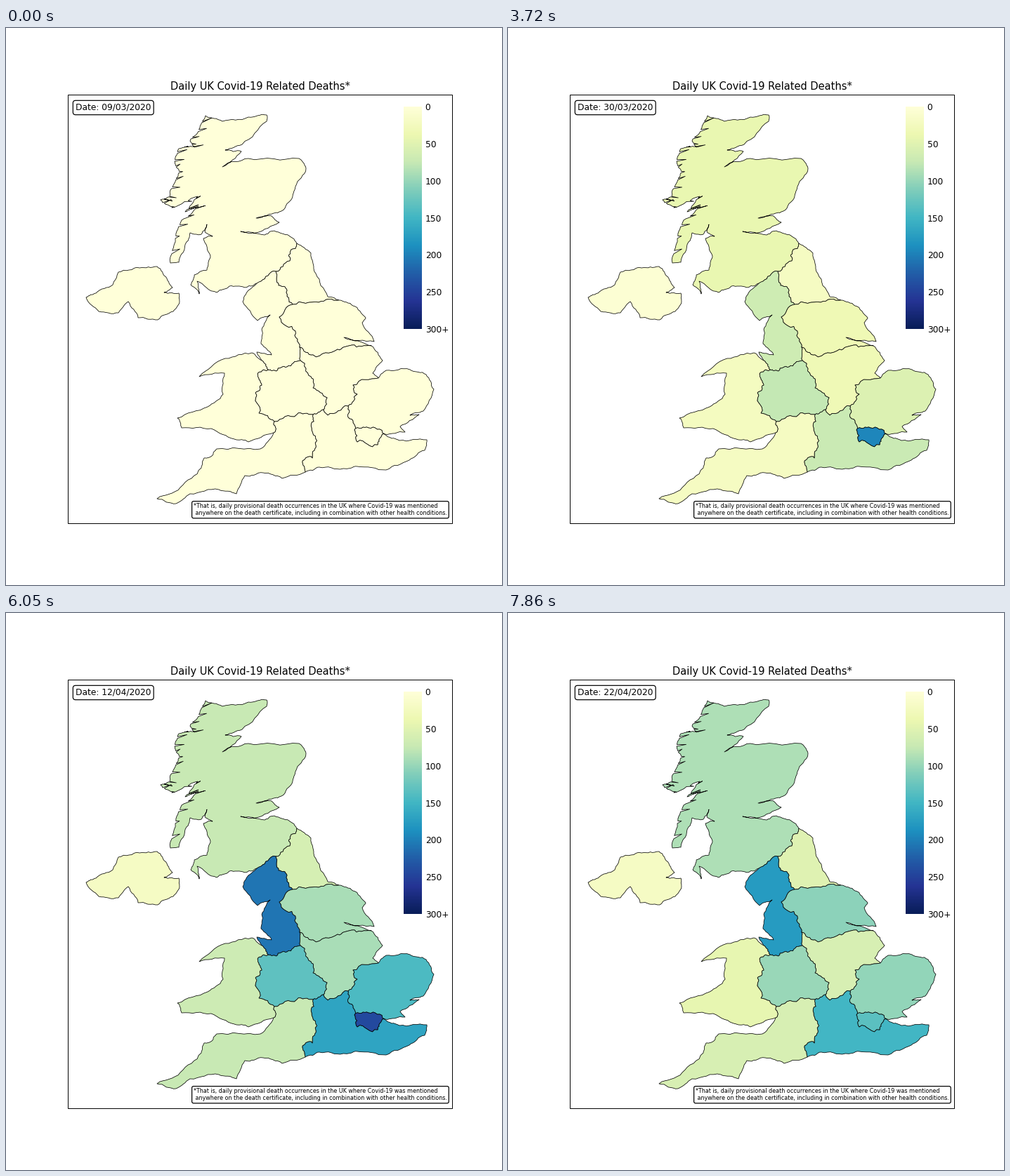
A matplotlib script for the animation above (8000 ms loop, 706x794 px).

```python
import numpy as np
import matplotlib.pyplot as plt
from matplotlib.animation import FuncAnimation
from matplotlib.patches import Polygon, Rectangle

W, H, DPI = 706, 794, 64
INTERVAL, FRAMES = 40, 200
FIRST_CHANGE, DAY_LENGTH, LAST_DAY = 100, 180.4, 44
CMAP = plt.get_cmap("YlGnBu")
rng = np.random.default_rng(4)

# Corner points x, y, x, y, ... in pixels; the fine detail is generated
COASTS = {
    "sc_east": [414, 307, 404, 297, 388, 291, 376, 290, 368, 295, 334, 290, 356, 292, 389, 277,
                378, 268, 356, 271, 381, 264, 392, 261, 408, 240, 412, 226, 427, 200, 417, 186,
                345, 186, 308, 198, 335, 176, 312, 174, 336, 166, 371, 133, 371, 124, 345, 127,
                308, 133, 284, 125],
    "sc_west": [284, 125, 276, 142, 262, 161, 268, 170, 246, 172, 240, 190, 246, 202, 241, 219,
                233, 240, 220, 245, 236, 256, 273, 240, 255, 262, 273, 256, 250, 274, 241, 300,
                234, 335],
    "sc_south": [234, 335, 246, 334, 257, 305, 262, 292, 278, 294, 286, 280, 283, 290, 294, 297,
                 281, 300, 291, 325, 286, 345, 268, 352, 263, 366, 275, 379, 272, 361, 300, 377,
                 318, 368, 340, 370, 363, 361],
    "ne_coast": [414, 307, 434, 321, 441, 350, 458, 383, 474, 388],
    "nw_coast": [363, 361, 345, 374, 337, 390, 358, 417, 376, 409, 364, 430, 363, 450, 378, 466,
                 357, 462, 364, 474],
    "y_coast": [474, 388, 494, 396, 512, 413, 507, 420, 524, 447, 481, 441, 520, 453],
    "em_coast": [520, 453, 536, 474, 522, 492, 530, 499],
    "wal_coast": [364, 474, 350, 463, 312, 471, 275, 497, 311, 492, 309, 522, 287, 540, 244, 556,
                  250, 570, 292, 571, 325, 586, 345, 590, 381, 577],
    "e_coast": [530, 499, 541, 488, 575, 487, 598, 494, 609, 515, 594, 546, 575, 552, 588, 551,
                561, 568, 568, 576, 539, 579],
    "se_coast": [539, 579, 560, 588, 599, 587, 596, 602, 574, 616, 541, 630, 500, 625, 480, 628,
                 446, 626, 426, 633],
    "sw_coast": [426, 633, 393, 642, 366, 634, 340, 638, 328, 664, 303, 658, 262, 664, 242, 678,
                 215, 671, 248, 655, 278, 627, 282, 613, 293, 610, 300, 600, 362, 600, 381, 577],
    "ni_coast": [114, 384, 128, 378, 152, 366, 160, 348, 190, 342, 215, 340, 229, 357, 237, 370,
                 225, 377, 246, 378, 247, 390, 238, 404, 216, 416, 188, 413, 174, 390, 160, 406,
                 132, 404, 114, 384],
}
BORDERS = {
    "sc_nw": [363, 361, 384, 347],
    "sc_ne": [384, 347, 404, 332, 405, 318, 414, 307],
    "ne_y": [474, 388, 445, 391, 408, 394],
    "nw_ne": [384, 347, 388, 367, 400, 374, 408, 394],
    "nw_y": [408, 394, 389, 412, 412, 432, 418, 455],
    "nw_em": [418, 455, 419, 474],
    "nw_wm": [419, 474, 400, 483, 385, 489, 373, 487],
    "nw_wal": [373, 487, 364, 474],
    "y_em": [520, 453, 492, 452, 472, 458, 437, 466, 418, 455],
    "em_e": [487, 539, 500, 522, 494, 509, 530, 499],
    "em_se": [452, 544, 458, 552, 487, 539],
    "wm_em": [419, 474, 434, 497, 437, 513, 457, 527, 452, 544],
    "wm_se": [452, 544, 437, 551],
    "wm_sw": [437, 551, 414, 551, 382, 561],
    "wm_wal": [382, 561, 360, 549, 355, 520, 364, 509, 358, 493, 373, 487],
    "wal_sw": [381, 577, 382, 561],
    "e_se": [487, 539, 487, 555, 496, 573],
    "lon_e": [496, 573, 516, 570, 539, 579],
    "lon_se": [539, 579, 533, 584, 529, 594, 500, 590, 496, 573],
    "se_sw": [426, 633, 422, 617, 436, 613, 441, 595, 435, 570, 437, 551],
}

# Outline of each region ("-" walks an arc backwards) and its deaths on KEY_DAYS
KEY_DAYS = [0, 18, 25, 29, 34, 38, 44]
REGIONS = [
    ("sc_east sc_west sc_south sc_nw sc_ne", [0, 27, 75, 82, 74, 100, 88]),
    ("ni_coast", [0, 4, 11, 11, 21, 14, 21]),
    ("ne_coast ne_y -nw_ne sc_ne", [0, 11, 50, 51, 62, 46, 52]),
    ("sc_nw nw_ne nw_y nw_em nw_wm nw_wal -nw_coast", [0, 42, 130, 190, 208, 215, 177]),
    ("y_coast y_em -nw_y -ne_y", [0, 21, 68, 80, 91, 117, 106]),
    ("em_coast -em_e -em_se -wm_em -nw_em -y_em", [0, 20, 65, 64, 91, 65, 59]),
    ("wm_em wm_se wm_sw wm_wal -nw_wm", [0, 62, 101, 107, 132, 130, 99]),
    ("wal_coast wal_sw wm_wal nw_wal", [0, 16, 40, 50, 70, 51, 44]),
    ("e_coast -lon_e -e_se em_e", [0, 37, 92, 128, 144, 116, 102]),
    ("se_coast se_sw -wm_se em_se e_se -lon_se", [0, 54, 106, 155, 168, 180, 149]),
    ("sw_coast wal_sw -wm_sw -se_sw", [0, 13, 42, 61, 74, 73, 59]),
    ("lon_e lon_se", [0, 155, 265, 297, 243, 203, 134]),
]


def px(size):
    """Pixels to points."""
    return size * 72 / DPI


def roughen(corners, amount, levels=3):
    """Fractal midpoint displacement along a polyline."""
    pts = np.reshape(corners, (-1, 2)).astype(float)
    for _ in range(levels):
        step = np.diff(pts, axis=0)
        length = np.hypot(*step.T)[:, None]
        normal = step[:, ::-1] * [-1, 1] / length
        push = rng.uniform(-1, 1, length.shape) * amount * np.minimum(length, 14)
        fine = np.empty((2 * len(pts) - 1, 2))
        fine[::2], fine[1::2] = pts, pts[:-1] + step / 2 + normal * push
        pts = fine
    return pts


def cut_lochs(pts, spacing=5):
    """Narrow inlets running inland (east) at regular steps."""
    at = np.arange(spacing, len(pts), spacing)
    depth = rng.uniform(5, 14, len(at))
    heads = pts[at - 1] + np.column_stack((depth, rng.uniform(-.5, .4, len(at)) * depth))
    return np.insert(pts, at, heads, axis=0)


def outline(names):
    return np.vstack([LINES[n[1:]][::-1] if n[0] == "-" else LINES[n] for n in names.split()])


def boxed_text(x, y, text, size):
    return ax.text(x, y, text, fontsize=px(size), va="baseline", bbox=dict(
        boxstyle="round,pad=0.3", facecolor="white", edgecolor="black", linewidth=px(1.22)))


plt.rcParams["font.family"] = "DejaVu Sans"
fig = plt.figure(figsize=(W / DPI, H / DPI), dpi=DPI, facecolor="white")
ax = fig.add_axes([0, 0, 1, 1])
ax.axis("off")

ax.imshow(np.linspace(0, 1, 256)[:, None], cmap=CMAP, extent=(566, 592, 429, 112),
          aspect="auto", interpolation="nearest")
for i in range(7):
    ax.text(596.7, 112 + i * 317 / 6, f"{50 * i}{'+' * (i == 6)}", fontsize=px(12.26),
            va="center_baseline")
ax.set(xlim=(0, W), ylim=(H, 0))

LINES = {name: roughen(corners, .12) for name, corners in COASTS.items()}
LINES |= {name: roughen(corners, .24) for name, corners in BORDERS.items()}
LINES["sc_west"] = cut_lochs(LINES["sc_west"])
shapes = [ax.add_patch(Polygon(outline(names), edgecolor="black", linewidth=px(0.75),
                               joinstyle="round")) for names, _ in REGIONS]

ax.add_patch(Rectangle((88.5, 95.5), 547, 611, fill=False, linewidth=px(0.98), snap=False))
ax.text(361.8, 87.9, "Daily UK Covid-19 Related Deaths*", fontsize=px(14.65), ha="center")
date = boxed_text(99, 117, "", 12.26)
boxed_text(267, 694.4, "*That is, daily provisional death occurrences in the UK where Covid-19 was "
           "mentioned\n anywhere on the death certificate, including in combination with other "
           "health conditions.", 7.97)


def update(frame):
    time = frame * INTERVAL + 30
    day = int(np.clip((time - FIRST_CHANGE) // DAY_LENGTH + 1, 0, LAST_DAY))
    # Epidemic growth is close to straight on a log scale
    for shape, (_, deaths) in zip(shapes, REGIONS):
        value = np.expm1(np.interp(day, KEY_DAYS, np.log1p(deaths)))
        shape.set_facecolor(CMAP(value / 300))
    dom, month = (day + 9, 3) if day < 23 else (day - 22, 4)
    date.set_text(f"Date: {dom:02d}/{month:02d}/2020")
    return shapes + [date]


anim = FuncAnimation(fig, update, frames=FRAMES, interval=INTERVAL, repeat=True,
                     repeat_delay=0, blit=False)
plt.show()
```
